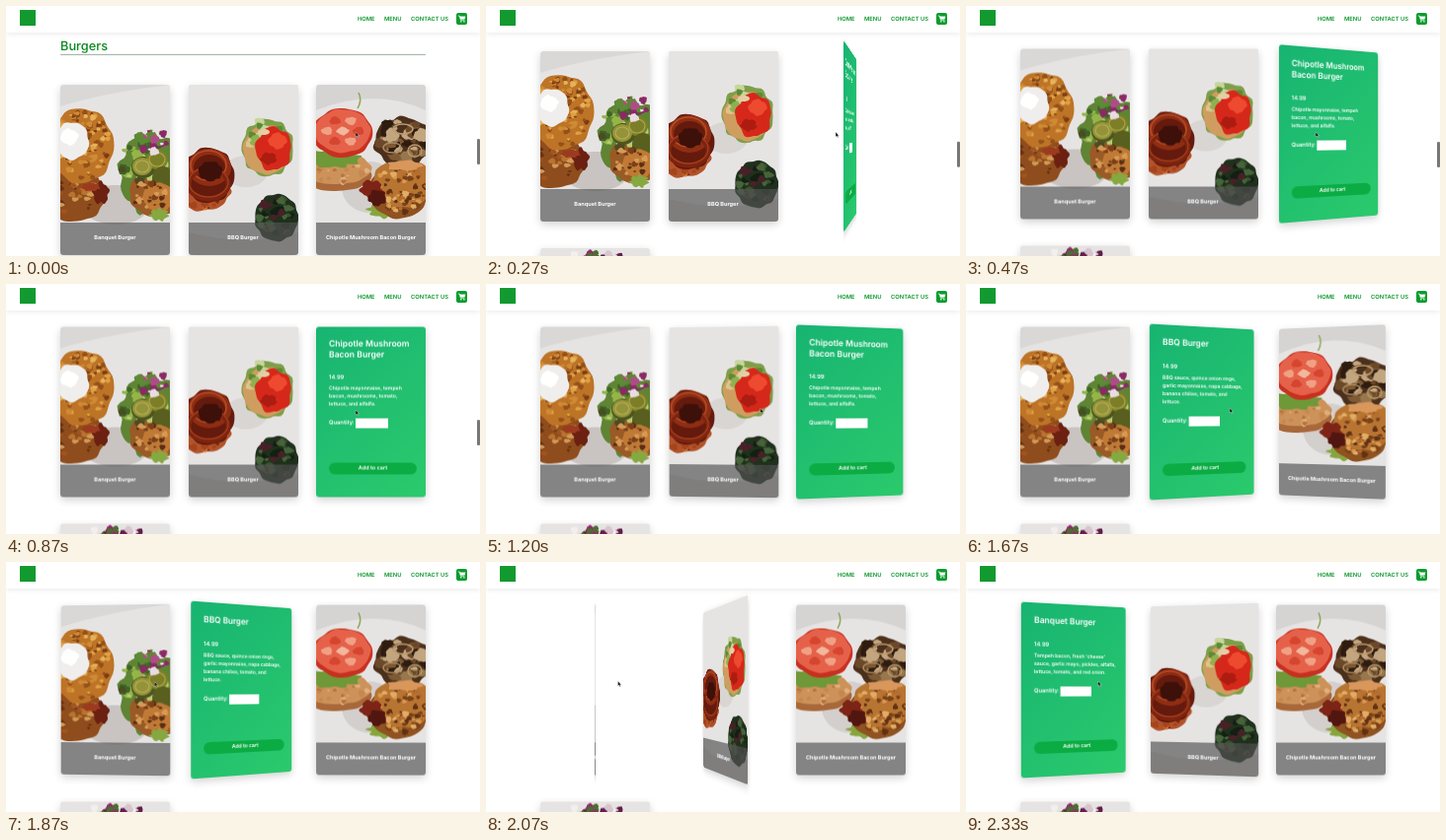
Animation, 480 px wide and 254 px high, one loop 2390 ms. Source, as an HTML page:

```html
<!DOCTYPE html>
<html lang="en">
<head>
<meta charset="utf-8">
<title>Burger menu</title>
<style>
html, body { margin: 0; width: 100%; height: 100%; overflow: hidden; background: #fff; }
body { position: relative; font-family: Inter, "Liberation Sans", sans-serif; text-rendering: geometricPrecision; }
#stage { position: absolute; left: 0; top: 0; width: 480px; height: 254px; overflow: hidden; background: #fff; }
#stage * { box-sizing: border-box; }
#page { position: absolute; left: 0; top: 0; width: 480px; height: 460px; }
h2 { position: absolute; left: 55px; top: 34px; width: 370px; height: 16px; margin: 0;
  font: 500 12.8px/16px Inter, sans-serif; color: #07891c; border-bottom: 1px solid #a2b5a6; }
.card { position: absolute; width: 111px; height: 173px; perspective: 500px; }
.inner { position: absolute; inset: 0; transform-style: preserve-3d; }
.face { position: absolute; inset: 0; overflow: hidden; border-radius: 3px; backface-visibility: hidden;
  box-shadow: 0 3px 9px rgba(0, 0, 0, .18); }
.face svg { position: absolute; inset: 0; }
.bar { position: absolute; left: 0; right: 0; bottom: 0; height: 33px; background: rgba(84, 84, 84, .66);
  color: #fff; text-align: center; white-space: nowrap; font: 700 5.55px/32px Inter, sans-serif; }
.back { transform: rotateY(180deg); padding: 13.2px 0 0 13px; color: #fff;
  background: linear-gradient(135deg, #17b472, #2bca6c); font-weight: 600; white-space: nowrap; }
.back div { line-height: 8px; font-size: 5.15px; }
.back .name { font-size: 8.6px; line-height: 10.7px; }
.back .price { font-size: 5.8px; margin: 13.9px 0 3px; }
.back .qty { font-size: 5.8px; line-height: 10px; margin-top: 10px; display: flex; }
.qty i { width: 33px; height: 10px; margin-left: 1.5px; background: #fff; }
.back .add { position: absolute; left: 13px; top: 137.5px; width: 89px; height: 12px; border-radius: 6px;
  background: #0cac45; text-align: center; font-size: 5.5px; line-height: 12px; }
nav { position: absolute; left: 0; top: 0; width: 480px; height: 27px; background: #fff;
  box-shadow: 0 1px 6px rgba(0, 0, 0, .09); font: 600 5.8px/8px Inter, sans-serif; color: #0a962a; }
nav span { position: absolute; top: 10px; white-space: nowrap; }
.logo { position: absolute; left: 14px; top: 4px; width: 16px; height: 16px; background: #129a30; }
.cart { position: absolute; left: 456px; top: 7px; width: 11px; height: 12px; border-radius: 2px; background: #089c2c; }
#thumb { position: absolute; left: 477px; top: 135px; width: 2.5px; height: 26px; border-radius: 1.3px; background: #777; }
#cursor { position: absolute; left: 0; top: 0; }
</style>
</head>
<body>
<div id="stage">
  <div id="page"><h2>Burgers</h2></div>
  <nav>
    <div class="logo"></div>
    <span style="left:356px">HOME</span>
    <span style="left:383px">MENU</span>
    <span style="left:410px">CONTACT US</span>
    <svg class="cart" viewBox="0 0 11 12">
      <path d="M1.8 3h1.5l1.1 4.2h4" fill="none" stroke="#fff" stroke-width=".8"/>
      <path d="M3.5 3.6h5.8L8.6 6.5H4.3z" fill="#fff"/>
      <circle cx="4.8" cy="8.7" r=".8" fill="#fff"/><circle cx="7.9" cy="8.7" r=".8" fill="#fff"/>
    </svg>
  </nav>
  <div id="thumb"></div>
  <svg id="cursor" width="6" height="8" viewBox="0 0 6 8">
    <path d="M.5 .5v5l1.2-1 .8 1.8.9-.4-.8-1.7h1.5z" fill="#111" stroke="#fff" stroke-width=".35"/>
  </svg>
</div>
<script>
const LOOP = 2390, STEP = 200 / 3, FLIP = 800;
const $ = id => document.getElementById(id);

// Seeded random numbers for food texture
let seed = 7;
const rnd = () => (seed = (seed * 16807) % 2147483647) / 2147483647;

// Closed outline with a wavy edge
function blob(x, y, rx, ry, fill, wave = 0, lobes = 7) {
  let d = '';
  for (let i = 0; i < 60; i++) {
    const a = i * Math.PI / 30;
    const r = 1 + wave * (Math.sin(lobes * a + x) + .5 * Math.sin((lobes + 4) * a + y));
    d += (i ? 'L' : 'M') + (x + rx * r * Math.cos(a)).toFixed(1) + ' ' + (y + ry * r * Math.sin(a)).toFixed(1);
  }
  return `<path d="${d}z" fill="${fill}"/>`;
}

const ring = (x, y, rx, ry, color, w) =>
  `<ellipse cx="${x}" cy="${y}" rx="${rx}" ry="${ry}" fill="none" stroke="${color}" stroke-width="${w}"/>`;

function scatter(x, y, rx, ry, n, size, colors) {
  let out = '';
  for (let i = 0; i < n; i++) {
    const a = rnd() * 2 * Math.PI, r = Math.sqrt(rnd()), s = size * (.5 + rnd());
    out += blob(x + rx * r * Math.cos(a), y + ry * r * Math.sin(a), s, s * (.5 + rnd() * .6),
      colors[i % colors.length], .12, 3);
  }
  return out;
}

const plate = (edge, shade) => `<rect width="111" height="173" fill="${shade}"/>` +
  `<path d="${edge}" fill="#e6e4e3"/>`;

const photos = {
  banquet: () => plate('M0 22Q45 8 111 0V173H0z', '#dad8d7') +
    blob(56, 122, 34, 20, '#c9c4c1') +
    blob(14, 112, 32, 27, '#8f4d1d', .03) +
    scatter(14, 116, 28, 20, 30, 3, ['#b9732f', '#6b3413', '#d09a55', '#a3541e']) +
    blob(21, 62, 33, 38, '#bd7426', .03) +
    scatter(21, 62, 31, 35, 110, 2.3, ['#e0a044', '#94501a', '#cf8a35', '#7c3c14', '#e6b25a']) +
    blob(12, 57, 17, 19, '#efeeed', .04, 5) + blob(9, 53, 9, 8, '#fff', .08, 4) +
    blob(41, 110, 8, 11, '#6b2012', .12, 5) + blob(31, 104, 9, 4, '#9c3a20', .1) +
    blob(91, 90, 31, 41, '#5f8434', .07, 9) +
    blob(96, 110, 26, 24, '#9a5a26', .03) +
    scatter(84, 80, 22, 28, 30, 4, ['#94b548', '#3f6427', '#b8cc72', '#4e4a22']) +
    blob(84, 84, 12, 11, '#4d5520') + blob(98, 76, 11, 10, '#7d7f28') + blob(83, 83, 10, 9, '#95933a') + blob(104, 95, 11, 12, '#59601f') +
    ring(98, 76, 8, 7, '#aaa64a', 1.2) + ring(83, 83, 7, 6, '#b3ae52', 1.2) +
    scatter(94, 56, 16, 12, 22, 3.2, ['#8a2a64', '#e9dbe3', '#b04b8a', '#5d8a35']) +
    blob(100, 114, 17, 14, '#c07a35', .05) +
    scatter(90, 112, 20, 15, 26, 2.5, ['#7c4019', '#d79a55', '#5b2f14']) +
    blob(100, 132, 9, 6, '#86a840', .15),

  bbq: () => plate('M0 0H111V150Q60 165 0 150z', '#d3d0ce') +
    blob(58, 88, 22, 16, '#d9d5d3') +
    blob(80, 64, 26, 29, '#7c9f48', .04, 9) +
    blob(79, 66, 24, 25, '#cf9d60', .02) +
    scatter(78, 52, 18, 15, 26, 3.5, ['#8fb050', '#dfc38c', '#5d8a34', '#c6d59a']) +
    blob(86, 65, 18, 22, '#d6281a', .06, 5) + blob(90, 57, 9, 8, '#ee4a30', .08, 4) +
    blob(81, 75, 8, 6, '#ad1c10', .1, 5) + blob(76, 48, 6, 3, '#e6cda4') +
    blob(14, 108, 28, 20, '#b2532a', .04) +
    scatter(14, 112, 25, 14, 36, 2.6, ['#d27a38', '#7e2a10', '#a5431c']) +
    blob(20, 92, 26, 28, '#641a0d', .03) +
    ring(21, 84, 19, 16, '#8f2d13', 6) + ring(20, 82, 18, 15, '#b44c24', 1.6) +
    ring(20, 101, 20, 15, '#7c2410', 5) + ring(20, 99, 20, 15, '#a23d1b', 1.3) +
    blob(22, 88, 12, 10, '#3d100a', .05) +
    blob(89, 135, 22, 24, '#1f301d', .025, 9) +
    scatter(89, 135, 18, 20, 36, 3.5, ['#38532c', '#131f13', '#46633a', '#4a2028']),

  chipotle: () => plate('M0 26Q60 2 111 26V173H0z', '#d6d4d3') +
    blob(54, 104, 28, 26, '#d3cfcd') +
    '<path d="M43 8q4 8-1 16" fill="none" stroke="#8fa85a" stroke-width="1.6"/>' +
    blob(20, 92, 36, 16, '#a9683a', .02) + blob(20, 85, 36, 16, '#cd9259', .02) +
    scatter(20, 87, 32, 13, 26, 2.2, ['#dfb07c', '#b5743f', '#c68850']) +
    blob(16, 75, 28, 9, '#6f9838', .11, 9) +
    blob(27, 49, 30, 25, '#c8301f', .02) + blob(27, 47, 28, 22, '#e5614a', .02) +
    [0, 1, 2, 3, 4, 5].map(i => blob(27 + 16 * Math.cos(i * 1.05), 47 + 12 * Math.sin(i * 1.05), 5.5, 4, i % 2 ? '#f0a184' : '#d5452f', .1, 3)).join('') +
    blob(27, 47, 6, 4, '#f2b79c', .1, 4) +
    blob(70, 127, 17, 8, '#86a53e', .13, 8) +
    blob(84, 108, 30, 28, '#8f5220', .02) +
    blob(88, 100, 31, 25, '#b87431', .03) +
    scatter(85, 106, 28, 24, 80, 2.3, ['#d79a4e', '#7a4219', '#b56d2c', '#e0ad66', '#5f3213']) +
    blob(56, 106, 11, 9, '#7d2416', .12, 5) + blob(62, 115, 9, 8, '#521610', .1, 5) +
    blob(88, 58, 29, 25, '#4b301c', .05, 7) +
    scatter(88, 57, 26, 22, 46, 4.5, ['#6b4829', '#2e1c10', '#98774d', '#7d5934', '#c2a680']) +
    ring(88, 45, 10, 5, '#bd9c70', 1.5) + ring(77, 64, 9, 5, '#ad8b60', 1.5) + ring(100, 67, 7, 6, '#b99a6c', 1.4) +
    blob(90, 82, 17, 5, '#d9975c', .1, 5),

  next: () => plate('M0 0H111V173H0z', '#eee') + blob(57, 34, 40, 26, '#c79858') +
    scatter(58, 9, 27, 5, 30, 3.5, ['#8e2f6b', '#d9c3cf', '#48702d', '#611d49', '#f3eef0'])
};

const menu = [
  { x: 55, y: 80, pic: 'banquet', name: 'Banquet Burger',
    text: "Tempeh bacon, fresh 'cheese'<br>sauce, garlic mayo, pickles, alfalfa,<br>lettuce, tomato, and red onion." },
  { x: 184.5, y: 80, pic: 'bbq', name: 'BBQ Burger',
    text: 'BBQ sauce, quince onion rings,<br>garlic mayonnaise, napa cabbage,<br>banana chilies, tomato, and<br>lettuce.' },
  { x: 314, y: 80, pic: 'chipotle', name: 'Chipotle Mushroom Bacon Burger', title: 'Chipotle Mushroom<br>Bacon Burger',
    text: 'Chipotle mayonnaise, tempeh<br>bacon, mushrooms, tomato,<br>lettuce, and alfalfa.' },
  { x: 55, y: 280, pic: 'next', name: '', text: '' }
];

const inners = menu.map(item => {
  const card = document.createElement('div');
  card.className = 'card';
  card.style.left = item.x + 'px';
  card.style.top = item.y + 'px';
  card.innerHTML = `<div class="inner">
    <div class="face"><svg width="111" height="173">${photos[item.pic]()}</svg><div class="bar">${item.name}</div></div>
    <div class="face back">
      <div class="name">${item.title || item.name}</div><div class="price">14.99</div>
      <div>${item.text}</div><div class="qty">Quantity: <i></i></div><div class="add">Add to cart</div>
    </div></div>`;
  $('page').append(card);
  return card.firstChild;
});

const clamp = v => Math.min(1, Math.max(0, v));
const part = (t, start, length) => clamp((t - start) / length);
const smooth = p => p * p * (3 - 2 * p);
const out = n => p => 1 - (1 - p) ** n;

// The CSS "ease" curve, solved by bisection
function ease(p) {
  let lo = 0, hi = 1;
  for (let i = 0; i < 24; i++) {
    const s = (lo + hi) / 2;
    if (.75 * s * (1 - s) + s ** 3 < p) lo = s; else hi = s;
  }
  return .3 * lo * (1 - lo) ** 2 + 3 * lo * lo * (1 - lo) + lo ** 3;
}

// Hover start and end of each card, in ms
const hovers = [[1833, 9999], [1168, 1774], [17, 1134]];

function render(t) {
  const scroll = out(2)(part(t, 0, 360));
  $('page').style.transform = `translateY(${-36.5 * scroll}px)`;
  $('thumb').style.transform = `translateY(${3 * scroll}px)`;
  $('thumb').style.opacity = 1 - part(t, 980, 220);
  hovers.forEach(([on, off], i) => {
    const turn = ease(part(t, on, FLIP)) - ease(part(t, off, FLIP));
    inners[i].style.transform = `rotateY(${-180 * turn}deg)`;
  });
  const a = smooth(part(t, 1025, 224)), b = out(3)(part(t, 1667, 400));
  $('cursor').style.transform = `translate(${353.5 - 87 * a - 133.5 * b}px, ${127.5 - 2 * a - 5 * b}px)`;
}

// The picture advances 15 times a second
const begin = performance.now();
function tick() {
  const t = (performance.now() - begin) % LOOP;
  render(Math.min(35, Math.floor((t + 4) / STEP)) * STEP);
  requestAnimationFrame(tick);
}
tick();
</script>
</body>
</html>
```
